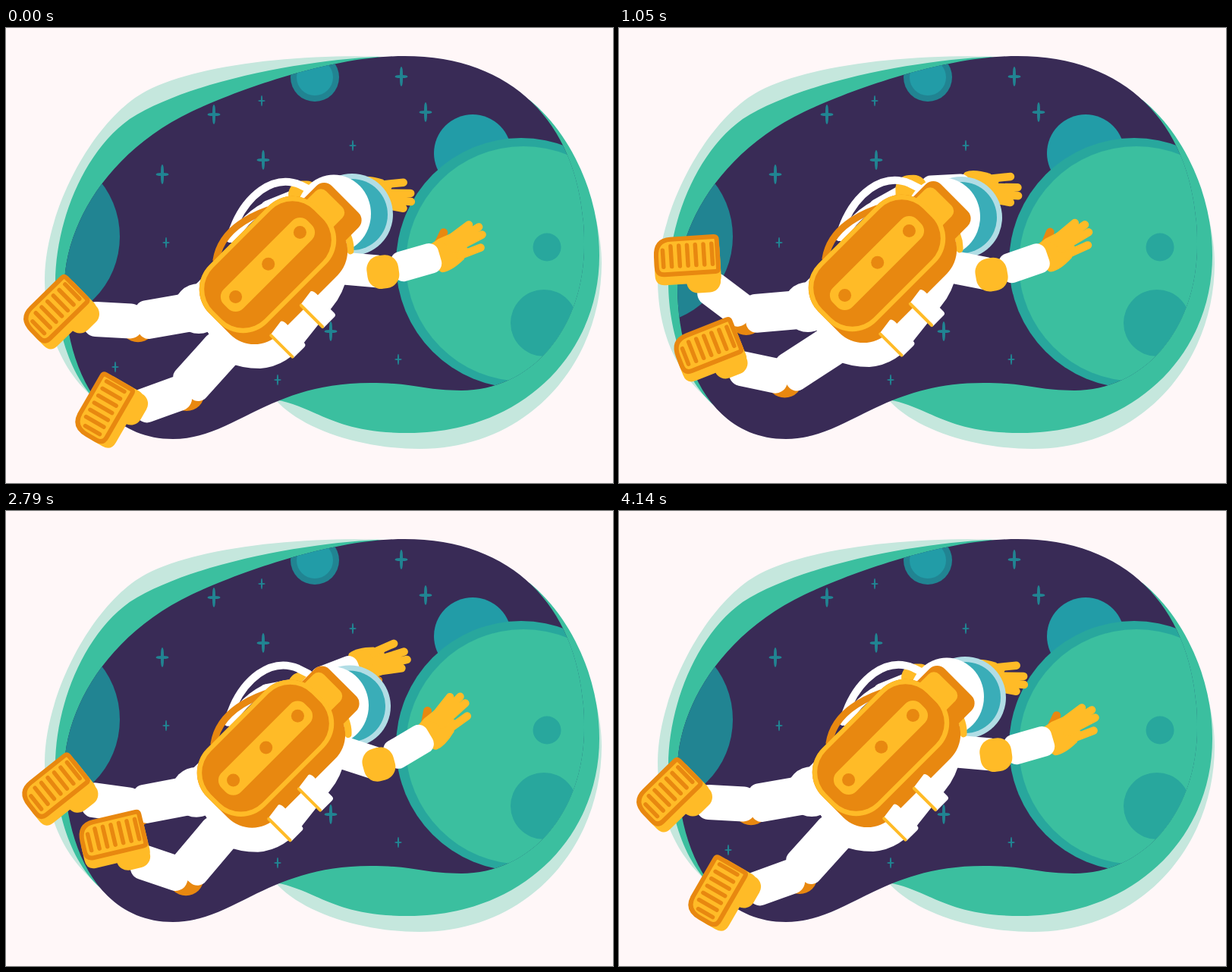
An HTML page for the animation above (4.17 s loop, 800x600 px).

```html
<!DOCTYPE html>
<html lang="en">
<head>
<meta charset="utf-8">
<title>Spacewalk</title>
<style>
html, body { margin: 0; width: 100%; height: 100%; overflow: hidden; background: #fff7f8; }
svg { display: block; width: 800px; height: 600px; }
</style>
</head>
<body>
<svg viewBox="0 0 800 600" xmlns="http://www.w3.org/2000/svg">
  <g id="scene"></g>
  <g id="astronaut"></g>
</svg>
<script>
const WHITE = '#fff', YELLOW = '#ffbb27', ORANGE = '#e88810';
const GREEN = '#3bbf9f', MINT = '#c5e7dd', NIGHT = '#392b56';
const TEAL = '#218492', BLUE = '#229ca7', SEA = '#28a79d';

// Shape helpers
const circle = (x, y, r, fill) => `<circle cx="${x}" cy="${y}" r="${r}" fill="${fill}"/>`;
const box = (x, y, w, h, r, fill) =>
  `<rect x="${x}" y="${y}" width="${w}" height="${h}" rx="${r}" fill="${fill}"/>`;
const path = (d, fill) => `<path d="${d}" fill="${fill}"/>`;
const stroke = (d, color, width) =>
  `<path d="${d}" fill="none" stroke="${color}" stroke-width="${width}" stroke-linecap="round" stroke-linejoin="round"/>`;
const place = (x, y, angle, content, flip = 1) =>
  `<g transform="translate(${x} ${y}) rotate(${angle}) scale(1 ${flip})">${content}</g>`;

// Background
const halo = 'M500 38C390 34 255 47 185 83C115 120 52 240 51 330C51 400 75 470 150 512L355 490C390 530 470 555 545 555C690 555 785 440 785 310C785 240 745 140 690 95Z';
const land = 'M490 38C400 42 245 68 163 120C100 165 65 260 65 335C65 410 95 490 150 513L355 490C410 500 430 534 530 534C680 534 782 430 782 300C782 220 745 140 690 95Z';
const sky = 'M525 37C430 37 310 80 245 110C130 165 77 265 77 340C77 440 120 542 220 542C300 542 345 468 480 468C540 468 550 478 600 478C690 478 762 400 762 285C762 140 680 37 525 37Z';

const ray = 'M-2-2Q-2-13 0-13T2-2z';
const star = [0, 90, 180, 270].map(a =>
  `<path d="${ray}" transform="scale(${a % 180 ? .65 : 1} 1) rotate(${a})"/>`).join('') + '<circle r="2.6"/>';
const stars = (scale, list) => list.map(([x, y]) =>
  `<g transform="translate(${x} ${y}) scale(${scale})" fill="${TEAL}">${star}</g>`).join('');

document.getElementById('scene').innerHTML =
  `<clipPath id="window"><path d="${sky}"/></clipPath>` +
  path(halo, MINT) + path(land, GREEN) + path(sky, NIGHT) +
  '<g clip-path="url(#window)">' +
  circle(34, 275, 116, TEAL) +
  circle(407, 65, 32, TEAL) + circle(407, 65, 24, BLUE) +
  circle(615, 165, 51, BLUE) +
  circle(679, 310, 165, SEA) + circle(682, 311, 155, GREEN) +
  circle(713, 289, 18.5, SEA) + circle(709, 389, 44, SEA) + '</g>' +
  stars(1, [[274, 114], [339, 174], [206, 193], [521, 64], [553, 111], [428, 400]]) +
  stars(.55, [[337, 96], [457, 155], [211, 283], [517, 437], [358, 464], [144, 447]]);

// Rigid parts
const glove =
  stroke('M10-13L24-23', ORANGE, 11) +
  path('M-8-17L14-19L36-17L42 12L30 21Q8 27-3 22Q-9 18-8-17z', YELLOW) +
  stroke('M22-11L58-16M25-5L68-7M25 3L67 4M28 14L57 18', YELLOW, 10.5);

const bootOutline = 'M-41-60H16q4 0 4 4V-18q0 4-4 4H-51q-10 0-10-10V-38q0-22 20-22z';
const treads = Array.from({ length: 7 }, (_, i) =>
  `M${-52 + i * 10.8} ${i ? -51 : -46}V-24`).join('');
const boot =
  `<g transform="translate(0 11)">${path(bootOutline, YELLOW)}${stroke(bootOutline, YELLOW, 6)}</g>` +
  box(-23, -24, 45, 37, 15, YELLOW) +
  path(bootOutline, YELLOW) + stroke(bootOutline, ORANGE, 6) + stroke(treads, ORANGE, 5.5);

const helmet =
  circle(0, 0, 54, '#b1dde5') + circle(0, 0, 47, '#3aadb8') +
  `<ellipse cx="-24" cy="-1" rx="49" ry="51.5" fill="${WHITE}"/>`;

const hose =
  stroke('M300 278Q314 250 345 234', WHITE, 12) +
  stroke('M295 278Q307 235 336 214Q362 196 388 207L402 214', WHITE, 10);

const torso =
  path('M250 338L330 260L440 285Q452 300 450 325Q445 350 430 368L395 412Q372 446 335 449Q310 449 290 440L262 395z', WHITE) +
  circle(254, 370, 33, WHITE);

const clip = u => place(u, 0, 0,
  path('M0 68L22 65Q26 66 25 77L18 81L24 85V107Q24 111 20 111H0z', WHITE) +
  stroke('M0 69V109', YELLOW, 4));

// Pack axes: x runs towards the head, y towards the lower right
const pack =
  stroke('M277 306Q284 262 345 240', ORANGE, 9) +
  stroke('M440 258Q455 275 454 294', YELLOW, 9) +
  place(345, 312, -45,
    box(-100, -54, 200, 129, 45, ORANGE) +
    box(70, -28, 63, 78, 14, ORANGE) +
    box(84, -24, 39, 50, 10, YELLOW) +
    box(-100, -54, 200, 108, 45, YELLOW) +
    box(-94, -48, 188, 96, 40, ORANGE) +
    box(-78, -18, 156, 36, 14, YELLOW) +
    [-60, 1, 60].map(x => circle(x, 0, 8.5, ORANGE)).join('') +
    clip(-7) + clip(-63));

// Key values of each joint angle and body offset; arms turn from the right, legs from the left
const LOOP = 4170, CYCLE = 4140;
const times = [0, 630, 1050, 1650, 2280, 3270];
const tracks = {
  driftX: [0, -5, -5, -5, -3, -3],
  driftY: [0, 3, -2, -5, 4, -4],
  nod: [0, 9, 6, 4, 13, 6],
  farShoulder: [-22, -47, -29, -11, -19, -4],
  farElbow: [-3, 3, -3, -9, -23, -14],
  nearShoulder: [5, -5, 11, 24, 5, 31],
  nearElbow: [-16, -30, -19, -11, -17, -39],
  farHip: [-10, -10, -5, -2, -6, -14],
  farKnee: [3, 41, 37, 35, 23, -3],
  nearHip: [-48, -37, -33, -32, -44, -52],
  nearKnee: [-20, 17, 12, 6, 21, 9]
};

// Smooth periodic curve through the keys
function sample(keys, t) {
  const n = times.length, wrap = i => (i + n) % n;
  const timeAt = i => times[wrap(i)] + Math.floor(i / n) * CYCLE;
  const rise = i => (keys[wrap(i + 1)] - keys[wrap(i)]) / (timeAt(i + 1) - timeAt(i));
  const slope = i => {
    const before = timeAt(i) - timeAt(i - 1), after = timeAt(i + 1) - timeAt(i);
    return (rise(i - 1) * after + rise(i) * before) / (before + after);
  };
  const k = times.findLastIndex(time => time <= t);
  const span = timeAt(k + 1) - timeAt(k), s = (t - timeAt(k)) / span, r = 1 - s;
  return keys[k] * r * r * (1 + 2 * s) + keys[wrap(k + 1)] * s * s * (3 - 2 * s) +
    span * s * r * (slope(k) * r - slope(k + 1) * s);
}

// Point at a distance from another, in a direction given in degrees
const reach = ([x, y], length, angle) =>
  [x + length * Math.cos(angle * Math.PI / 180), y + length * Math.sin(angle * Math.PI / 180)];

// Rounded sleeve along a limb axis
const sleeve = ([x, y], angle, from, to, width, radius) =>
  place(x, y, angle, box(from, -width / 2, to - from, width, radius, WHITE));

function arm(shoulder, upper, lower, wristTurn, width, reachLength, flip) {
  const elbow = reach(shoulder, reachLength, upper), wrist = reach(elbow, 73, lower);
  return sleeve(shoulder, upper, -6, reachLength, width, 8) +
    place(...wrist, lower + wristTurn, glove, flip) +
    sleeve(elbow, lower, 13, 78, 40, 13) +
    place(...elbow, lower / 2, box(-21, -22, 42, 44, 18, YELLOW));
}

function leg(hip, upper, lower, length, width, footTurn) {
  const knee = reach(hip, length, 180 + upper), ankle = reach(knee, 69, 180 + lower);
  const patch = reach(knee, 4, 90 + upper);
  return circle(...patch, 23.5, ORANGE) +
    sleeve(knee, 180 + lower, -7, 71, 46, 16) +
    sleeve(hip, 180 + upper, -5, length + 1, width, 14) +
    place(...ankle, lower * 1.2 + footTurn, boot);
}

const figure = document.getElementById('astronaut');

function draw(ms) {
  const t = Math.floor(ms % LOOP / 30) * 30 % CYCLE;
  const p = {};
  for (const name in tracks) p[name] = sample(tracks[name], t);
  const joint = (x, y) => [x + p.driftX, y + p.driftY];
  const body = content => place(p.driftX, p.driftY, 0, content);
  figure.innerHTML =
    arm(joint(345, 243), p.farShoulder, p.farElbow, 5, 30, 52, -1) +
    body(hose) +
    place(...joint(456, 246 + p.nod), 0, helmet) +
    leg(joint(258, 372), p.farHip, p.farKnee, 86, 51, -48) +
    leg(joint(290, 418), p.nearHip, p.nearKnee, 82, 54, -36) +
    body(torso) +
    arm(joint(444, 317), p.nearShoulder, p.nearElbow, -13, 43, 53, 1) +
    body(pack);
}

const start = performance.now();
function tick() {
  draw(performance.now() - start);
  requestAnimationFrame(tick);
}
tick();
</script>
</body>
</html>
```
